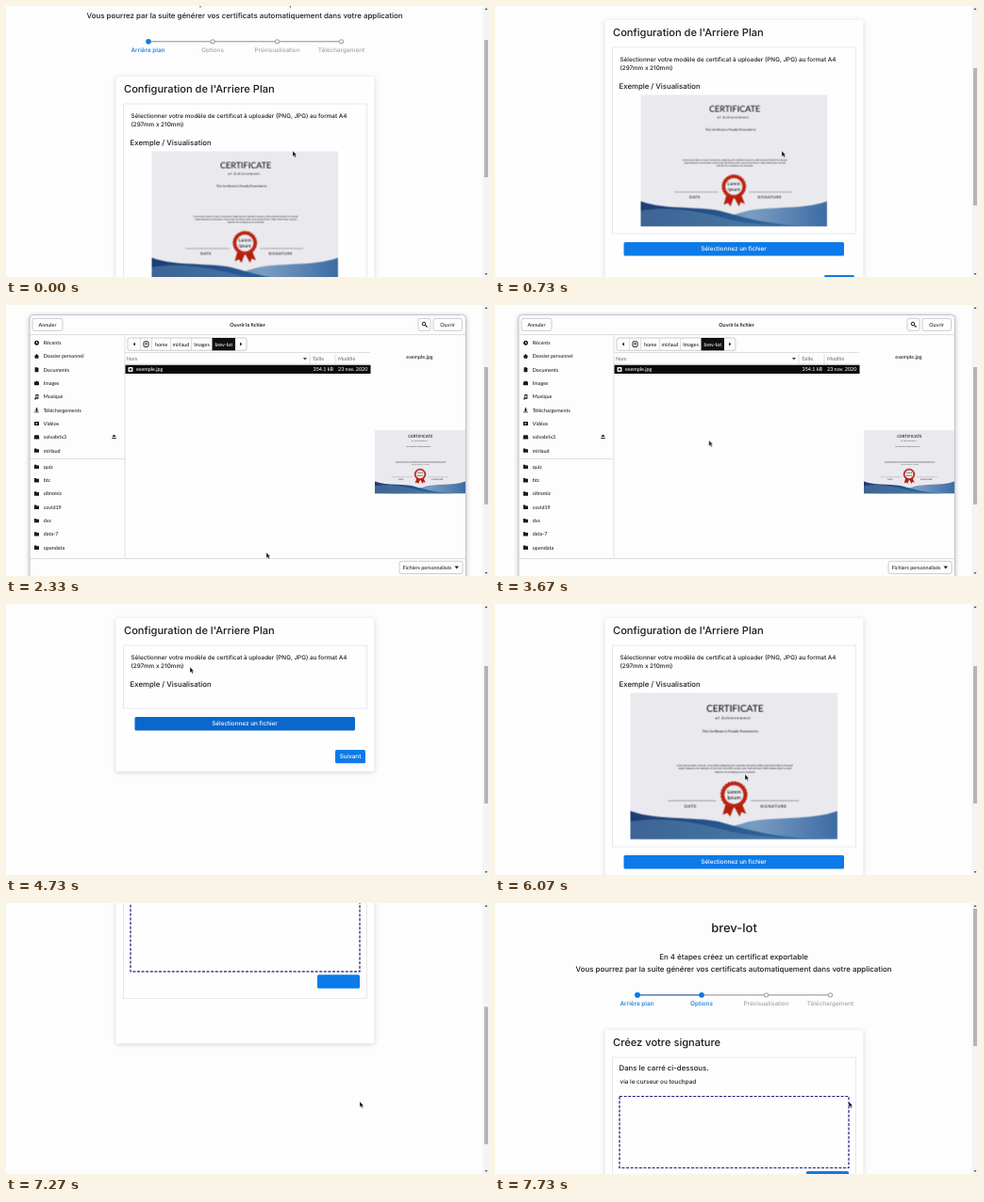
An HTML page for the animation above (8000 ms loop, 512 by 288 pixels).

```html
<!DOCTYPE html>
<html lang="fr">
<head>
<meta charset="utf-8">
<title>Certificat</title>
<style>
html, body { margin: 0; width: 100%; height: 100%; overflow: hidden; background: #fdfdfd; }
svg.stage { display: block; width: 512px; height: 288px; }
text { font-family: Inter, sans-serif; font-weight: 500; fill: #1c1c20; text-rendering: geometricPrecision; }
.mid { text-anchor: middle; }
.h1 { font-size: 13px; }
.h2 { font-size: 11.1px; }
.lead { font-size: 7.9px; }
.h3 { font-size: 7.8px; }
.body { font-size: 6.35px; }
.on { fill: #0a78dc; }
.off { fill: #a4a4a4; }
.white { fill: #fff; }
.card { fill: #fefefe; filter: drop-shadow(0 1px 2.5px #d4d4dc); }
.inner { fill: none; stroke: #e2e2ea; stroke-width: .8; }
.blue { fill: #0c7ae8; }
.ring { fill: #fdfdfd; stroke: #a8a8a8; stroke-width: 1.1; }

.cert text { font-family: Lato, sans-serif; text-anchor: middle; font-weight: 400; fill: #000; }
.cert .tiny { font-size: 2.6px; }
.dlg text { font-family: Lato, sans-serif; font-size: 5.4px; }
.dlg .white { fill: #fff; }
.dlg .bold { font-weight: 700; }
.dlg .dim { fill: #747478; }
.box { fill: #fdfdfd; stroke: #b8b8bc; stroke-width: .7; }
.rule { fill: none; stroke: #d2d2d6; stroke-width: .7; }

.anim { animation: 8s linear infinite; }
.step { animation: 8s step-end infinite; }
.page { animation-name: scroll; }
.thumb { animation-name: thumb; }
.cursor { animation-name: point; }
.arrow { animation-name: arrow; }
.hand { animation-name: hand; }
.one { animation-name: one; }
.two { animation-name: two; }
.old { animation-name: old; }
.new { animation-name: new; }
.dlg { animation-name: dlg; }
.cardH { animation-name: cardH; }
.innerH { animation-name: innerH; }
.foot { animation-name: foot; }
.pick { animation-name: pick; }

@keyframes scroll {
  0%, .5% { transform: translateY(-60px); }
  3.375%, 77% { transform: translateY(-120px); }
  80%, 89.8% { transform: translateY(-220px); animation-timing-function: ease-in-out; }
  96.6%, 100% { transform: none; }
}
@keyframes thumb {
  0%, .5% { transform: translateY(30px); }
  3.375%, 77% { transform: translateY(60px); }
  80%, 89.8% { transform: translateY(110px); animation-timing-function: ease-in-out; }
  96.6%, 100% { transform: none; }
}
@keyframes point {
  0%, 9.125% { transform: translate(304px, 154px); animation-timing-function: ease-in-out; }
  16.625%, 34.125% { transform: translate(276px, 263px); animation-timing-function: ease-in-out; }
  55%, 68.3% { transform: translate(195px, 67px); animation-timing-function: ease-in-out; }
  75.875%, 77.5% { transform: translate(265px, 181px); }
  80%, 80.875% { transform: translate(270px, 192px); animation-timing-function: ease-in-out; }
  89.125%, 100% { transform: translate(375px, 211px); }
}
@keyframes arrow { 0%, 28.375%, 81.7%, 90% { opacity: 1; } 18.375%, 79.125%, 88% { opacity: 0; } }
@keyframes hand { 0%, 28.375%, 81.7%, 90% { opacity: 0; } 18.375%, 79.125%, 88% { opacity: 1; } }
@keyframes one { 0% { opacity: 1; } 90%, 100% { opacity: 0; } }
@keyframes two { 0% { opacity: 0; } 90%, 100% { opacity: 1; } }
@keyframes old { 0% { opacity: 1; } 59.125%, 100% { opacity: 0; } }
@keyframes new { 0% { opacity: 0; } 60%, 100% { opacity: 1; } }
@keyframes dlg { 0% { opacity: 0; } 28.375% { opacity: 1; } 59.125%, 100% { opacity: 0; } }
@keyframes cardH { 0% { height: 294px; } 59.125% { height: 163px; } 60%, 100% { height: 310px; } }
@keyframes innerH { 0% { height: 198px; } 59.125% { height: 67px; } 60%, 100% { height: 214px; } }
@keyframes foot {
  0% { transform: none; }
  59.125% { transform: translateY(-131px); }
  60%, 100% { transform: translateY(16px); }
}
@keyframes pick {
  0%, 18.2%, 61.7%, 77.5%, 82.8%, 100% { fill: #0c7ae8; }
  20.5%, 59.9%, 79.3%, 81% { fill: #0a68cc; }
}
</style>
</head>
<body>
<svg class="stage" viewBox="0 0 512 288">
  <defs>
    <linearGradient id="navy">
      <stop offset="0" stop-color="#1c3c74"/><stop offset=".5" stop-color="#2a5a92"/><stop offset="1" stop-color="#3f78ac"/>
    </linearGradient>
    <linearGradient id="steel">
      <stop offset="0" stop-color="#3f78a8"/><stop offset=".6" stop-color="#7a9cc2"/><stop offset="1" stop-color="#3c6ca4"/>
    </linearGradient>
    <symbol id="cert" viewBox="0 0 220 156" preserveAspectRatio="none">
      <g class="cert">
        <rect width="220" height="156" fill="#e9e9ee"/>
        <path d="M0 156C60 156 92 147 120 139C145 131 190 137 220 126V156Z" fill="url(#steel)"/>
        <path d="M0 126C30 137 75 131 100 139C128 147 160 156 220 156H0Z" fill="url(#navy)"/>
        <path d="M0 137C40 131 72 139 104 147S180 156 220 156H0Z" fill="#5f8cb4" opacity=".5"/>
        <text x="111" y="19.6" font-size="10.1">CERTIFICATE</text>
        <text x="109" y="28" font-size="4" letter-spacing=".75">of Achievement</text>
        <text x="106" y="42" font-size="3.5">This Certificate is Proudly Presented to</text>
        <text class="tiny" x="111" y="78">Lorem ipsum dolor sit amet, consectetur adipiscing elit, sed diam nonummy nibh euismod tincidunt ut laoreet</text>
        <text class="tiny" x="111" y="81.6">magna aliquam erat volutpat, ut wisi enim ad minim veniam, quis nostrud exerci tation ullamcorper suscipit</text>
        <text class="tiny" x="111" y="85.2">lobortis nisl ut aliquip ex ea commodo</text>
        <path d="M40 115H91M128 115H179" stroke="#6c6c74" stroke-width=".6"/>
        <text x="64" y="122.5" font-size="4.4" letter-spacing=".5">DATE</text>
        <text x="152" y="122.5" font-size="4.4" letter-spacing=".5">SIGNATURE</text>
        <path d="M101 119L98 130 103 128 106 132 110 121 116 132 118 127 123 129 118 117Z" fill="#b3200f"/>
        <circle cx="110" cy="108.5" r="12" fill="#e9e9ee" stroke="#bd2412" stroke-width="3.6"/>
        <circle cx="110" cy="108.5" r="13.6" fill="none" stroke="#bd2412" stroke-width="1.6" stroke-dasharray="2.2 1.36"/>
        <text x="110" y="107.4" font-size="5.4">Lorem</text>
        <text x="110" y="113.2" font-size="5.4">Ipsum</text>
      </g>
    </symbol>
  </defs>

  <rect width="512" height="288" fill="#fdfdfd"/>

  <g class="page anim">
    <text class="h1 mid" x="253.5" y="31">brev-lot</text>
    <text class="lead mid" x="253" y="60">En 4 étapes créez un certificat exportable</text>
    <text class="lead mid" x="253" y="73">Vous pourrez par la suite générer vos certificats automatiquement dans votre application</text>
    <path d="M151 97.8H355" stroke="#8c8c90"/>
    <circle class="ring" cx="219" cy="97.8" r="2.1"/>
    <circle class="ring" cx="287.5" cy="97.8" r="2.1"/>
    <circle class="ring" cx="355.5" cy="97.8" r="2.1"/>
    <circle class="blue" cx="151" cy="97.8" r="2.8"/>
    <g font-size="6.4">
      <text class="mid on" x="150.5" y="109.2">Arrière plan</text>
      <text class="mid off one step" x="219" y="109.2">Options</text>
      <text class="mid on two step" x="219" y="109.2">Options</text>
      <text class="mid off" x="287.5" y="109.2">Prévisualisation</text>
      <text class="mid off" x="355.5" y="109.2">Téléchargement</text>
    </g>

    <g class="one step">
      <rect class="card cardH step" x="116.5" y="135" width="274" height="294" rx="2"/>
      <text class="h2" x="125" y="152.2">Configuration de l'Arriere Plan</text>
      <rect class="inner innerH step" x="124.5" y="164" width="258" height="198"/>
      <text class="body" x="132.5" y="179.2">Sélectionner votre modèle de certificat à uploader (PNG, JPG) au format A4</text>
      <text class="body" x="132.5" y="188.3">(297mm x 210mm)</text>
      <text class="h3" x="131.5" y="208">Exemple / Visualisation</text>
      <use class="old step" href="#cert" x="154.5" y="214.5" width="197.5" height="140"/>
      <use class="new step" href="#cert" x="143.5" y="214.5" width="219.5" height="155.5"/>
      <g class="foot step">
        <rect class="pick anim" x="136.5" y="371" width="233.5" height="14.5" rx="1.5"/>
        <text class="body mid white" x="253" y="380.4">Sélectionnez un fichier</text>
        <rect class="blue" x="349" y="406" width="32" height="14.3" rx="1.5"/>
        <text class="body mid white" x="365" y="415.3">Suivant</text>
      </g>
    </g>

    <g class="two step">
      <path d="M151 97.8H219" stroke="#3c68b4"/>
      <circle class="blue" cx="151" cy="97.8" r="2.8"/>
      <circle class="blue" cx="219" cy="97.8" r="2.8"/>
      <rect class="card" x="116.5" y="135" width="274" height="223" rx="2"/>
      <text class="h2" x="125" y="152.2">Créez votre signature</text>
      <rect class="inner" x="124.5" y="164" width="258" height="146"/>
      <text class="h3" x="131.5" y="178.2">Dans le carré ci-dessous.</text>
      <text class="body" x="132.5" y="192">via le curseur ou touchpad</text>
      <rect x="132" y="205.5" width="243" height="76" fill="none" stroke="#1c1c80" stroke-width="1.2" stroke-dasharray="3 1.6"/>
      <rect class="blue" x="330" y="285" width="45" height="14.3" rx="1.5"/>
    </g>
  </g>

  <rect x="505.5" width="6.5" height="288" fill="#f4f4f4"/>
  <rect class="thumb anim" x="507" y="6" width="4" height="146" fill="#b4b4b4"/>
  <path d="M507.5 4L509 2 510.5 4ZM507.5 284L509 286 510.5 284Z" fill="#505050"/>

  <g class="dlg step">
    <rect x="25" y="10.5" width="462.5" height="290" rx="4" fill="#fdfdfd" stroke="#c4c4c8" style="filter:drop-shadow(0 1px 2.5px #c0c0c8)"/>
    <path class="rule" d="M25 31.5H487M126 31.5V269M25 163.5H126M25 269.5H487M126 50.5H386M126 63H386M322 52V63M349 52V63"/>
    <rect class="box" x="28" y="14.3" width="32" height="13" rx="2"/>
    <rect class="box" x="437" y="14.3" width="13" height="13" rx="2"/>
    <rect class="box" x="453" y="14.3" width="30.5" height="13" rx="2"/>
    <text class="mid" x="44" y="22.7">Annuler</text>
    <text class="mid bold" x="256" y="22.7">Ouvrir le fichier</text>
    <text class="mid" x="468" y="22.7">Ouvrir</text>
    <circle cx="443" cy="20" r="1.8" fill="none" stroke="#222"/>
    <path d="M444.4 21.4L446.5 23.5" stroke="#222" stroke-width="1.2"/>

    <rect class="box" x="129" y="35" width="126" height="13.3" rx="2"/>
    <rect x="218.5" y="35" width="24.5" height="13.3" fill="#101012"/>
    <path class="rule" d="M142.5 35V48M154.5 35V48M174.5 35V48M196.5 35V48"/>
    <path d="M137 39.8V43.4L134.6 41.6ZM248 39.8V43.4L250.4 41.6Z" fill="#222"/>
    <rect x="146" y="38.8" width="5" height="5.6" rx="1" fill="none" stroke="#222"/>
    <circle cx="148.5" cy="41.2" r="1" fill="#222"/>
    <text class="mid" x="164.7" y="43.6">home</text>
    <text class="mid" x="185.5" y="43.6">mirlaud</text>
    <text class="mid" x="207.5" y="43.6">Images</text>
    <text class="mid white" x="230.8" y="43.6">brev-lot</text>

    <text class="dim" x="128" y="59">Nom</text>
    <path d="M314.8 56H319L316.9 58.6Z" fill="#444"/>
    <text class="dim" x="325" y="59">Taille</text>
    <text class="dim" x="352" y="59">Modifié</text>
    <rect x="126.5" y="63.8" width="260" height="9.2" fill="#09090a"/>
    <rect x="129.5" y="66" width="5" height="5" rx=".8" fill="#eee"/>
    <circle cx="132" cy="68.5" r="1.2" fill="#222"/>
    <text class="white" x="138" y="70.3">exemple.jpg</text>
    <text class="white" x="325.5" y="70.3">354.1 kB</text>
    <text class="white" x="352" y="70.3">23 nov. 2020</text>

    <text class="mid" x="438.5" y="57">exemple.jpg</text>
    <use href="#cert" x="391" y="133" width="96" height="67.5"/>
    <rect class="box" x="417" y="272.3" width="67" height="13.3" rx="2"/>
    <text x="420.5" y="280.8">Fichiers personnalisés</text>
    <path d="M475.5 277.6H480L477.75 280.6Z" fill="#222"/>
    <path d="M112.3 140H116.7L114.5 137.4ZM112.3 141H116.7V142H112.3Z" fill="#222"/>
    <g id="places"></g>
  </g>

  <g class="cursor anim">
    <path class="arrow step" d="M0 0V6L1.4 4.8 2.4 7 3.4 6.5 2.4 4.4H4.2Z" fill="#111" stroke="#fff" stroke-width=".3"/>
    <path class="hand step" d="M0 0.8Q.8-.2 1.5.8V2.4L4.6 3Q5.4 3.3 5.1 5L4.4 6.6H.8L-1.2 4 0 3.8Z" fill="#111" stroke="#fff" stroke-width=".3"/>
  </g>
</svg>
<script>
const names = ['Récents', 'Dossier personnel', 'Documents', 'Images', 'Musique',
  'Téléchargements', 'Vidéos', 'solvabrix3', 'mirlaud',
  'quiz', 'btc', 'oltremiz', 'covid19', 'dvs', 'data-7', 'opendata'];
const folder = 'M0-2.2H2L2.7-1.4H5V2.2H0Z';
const icons = [
  'M2.5-2.5A2.5 2.5 0 1 0 2.6-2.5ZM2.2-1.4H2.9V.2H4V.8H2.2Z',
  'M2.5-2.6L5.2 0H4.4V2.3H.6V0H-.2Z',
  'M.6-2.5H3.4L4.4-1.5V2.5H.6Z',
  'M0-1.7H1.4L2-2.4H3.2L3.8-1.7H5V2.2H0Z',
  'M1.4-2.5H4.4V1.6A1 1 0 1 1 3.6.7V-1.2H2.2V2A1 1 0 1 1 1.4 1.2Z',
  'M1.8-2.5H3.2V-.2H4.6L2.5 1.6 .4-.2H1.8ZM0 1.8H5V2.6H0Z',
  'M0-2H5V2H0ZM1.8-1V1L3.6 0Z',
  'M.3-2H4.7L5.2.5V2.2H-.2V.5Z'
];
document.getElementById('places').innerHTML = names.map((name, i) => {
  const y = 40.2 + i * 14.3 + (i > 8 ? 3 : 0);
  return `<path transform="translate(30 ${y})" d="${icons[i] || folder}" fill="#1a1a1c" fill-rule="evenodd"/>` +
    `<text x="39.8" y="${y + 1.9}">${name}</text>`;
}).join('');
</script>
</body>
</html>
```
